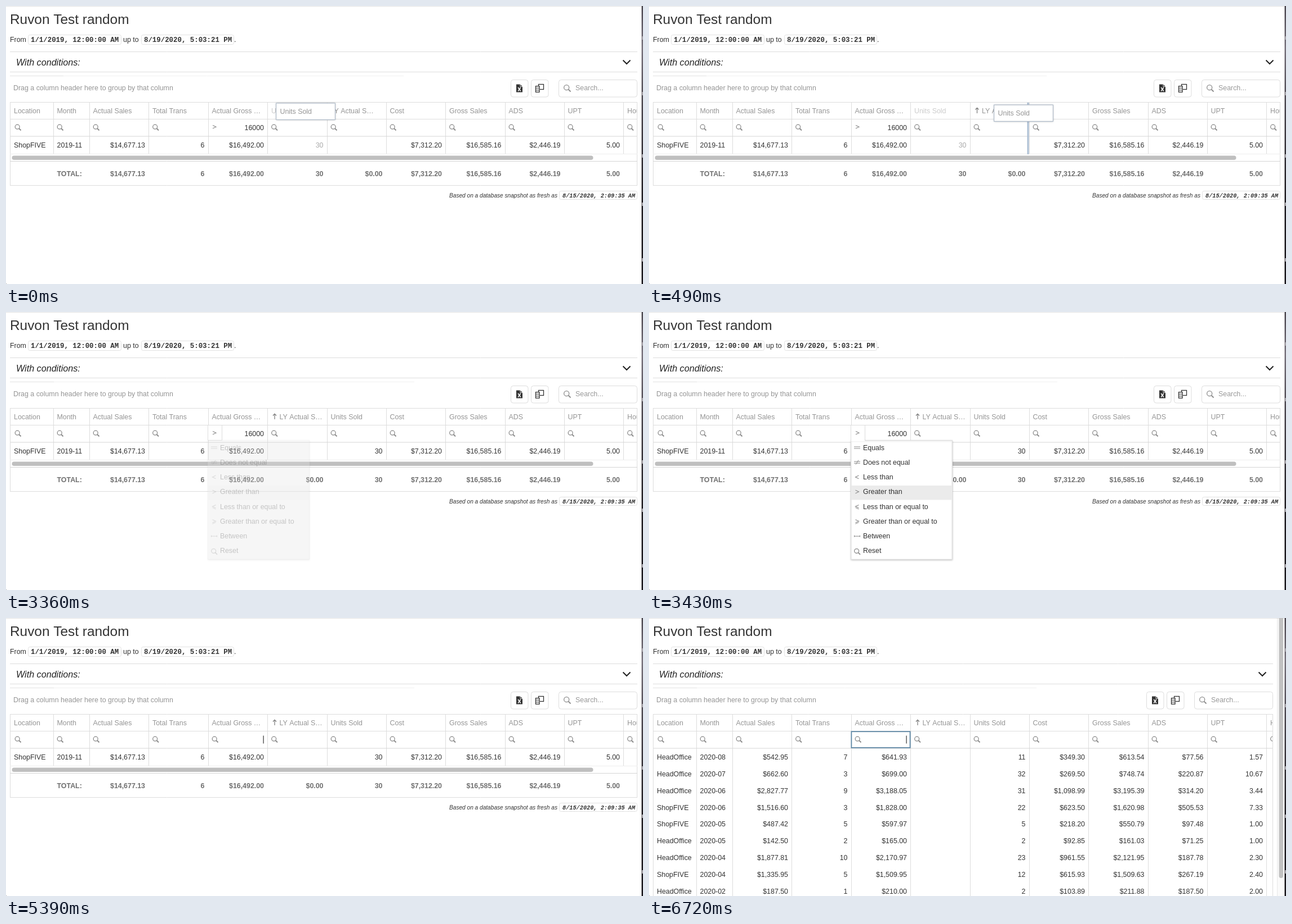
An HTML page with a canvas for the animation above (6.79 s loop, 1131 by 495 pixels).

```html
<!DOCTYPE html>
<html lang="en">
<head>
<meta charset="utf-8">
<title>Report grid</title>
<style>
  html, body { margin: 0; width: 100%; height: 100%; overflow: hidden; background: #fff; }
  canvas { display: block; }
</style>
</head>
<body>
<canvas id="stage" width="1131" height="495"></canvas>
<script>
const ctx = document.getElementById('stage').getContext('2d');
const LOOP = 6790, TICK = 70;
const SANS = '"Liberation Sans", Arial, sans-serif';
const MONO = '"Liberation Mono", monospace';
const INK = '#333', MUTED = '#959595', LINE = '#ddd', ICON = '#8a8a8a';
const BODY = `12.4px ${SANS}`, BOLD = `bold 12.4px ${SANS}`;

const edges = [7.5, 84, 148, 253.5, 359, 464.5, 570, 675, 780.5, 886, 991, 1096.5, 1202];
const titles = ['Location', 'Month', 'Actual Sales', 'Total Trans', 'Actual Gross …',
  'Units Sold', 'LY Actual S…', 'Cost', 'Gross Sales', 'ADS', 'UPT', 'Hours'];
const UNITS = 5, LY = 6;

const parse = line => line.trim().split(/\s+/).map(s => s === '-' ? '' : s);
const filtered = parse('ShopFIVE 2019-11 $14,677.13 6 $16,492.00 30 - $7,312.20 $16,585.16 $2,446.19 5.00');
const totals = parse('- TOTAL: $14,677.13 6 $16,492.00 30 $0.00 $7,312.20 $16,585.16 $2,446.19 5.00');
const allRows = `HeadOffice 2020-08 $542.95 7 $641.93 11 - $349.30 $613.54 $77.56 1.57
  HeadOffice 2020-07 $662.60 3 $699.00 32 - $269.50 $748.74 $220.87 10.67
  HeadOffice 2020-06 $2,827.77 9 $3,188.05 31 - $1,098.99 $3,195.39 $314.20 3.44
  ShopFIVE 2020-06 $1,516.60 3 $1,828.00 22 - $623.50 $1,620.98 $505.53 7.33
  ShopFIVE 2020-05 $487.42 5 $597.97 5 - $218.20 $550.79 $97.48 1.00
  HeadOffice 2020-05 $142.50 2 $165.00 2 - $92.85 $161.03 $71.25 1.00
  HeadOffice 2020-04 $1,877.81 10 $2,170.97 23 - $961.55 $2,121.95 $187.78 2.30
  ShopFIVE 2020-04 $1,335.95 5 $1,509.95 12 - $615.93 $1,509.63 $267.19 2.40
  HeadOffice 2020-02 $187.50 1 $210.00 2 - $103.89 $211.88 $187.50 2.00`.split('\n').map(parse);
const menuItems = ['Equals', 'Does not equal', 'Less than', 'Greater than', 'Less than or equal to',
  'Greater than or equal to', 'Between', 'Reset'];

function text(s, x, y, color = INK, font = BODY, align = 'left') {
  ctx.font = font;
  ctx.fillStyle = color;
  ctx.textAlign = align;
  ctx.fillText(s, x, y);
}

function fill(x, y, w, h, color) {
  ctx.fillStyle = color;
  ctx.fillRect(x, y, w, h);
}

function path(points, color, width = 1) {
  ctx.beginPath();
  points.forEach(([x, y]) => ctx.lineTo(x, y));
  ctx.strokeStyle = color;
  ctx.lineWidth = width;
  ctx.stroke();
}

const hLine = (x1, x2, y, color = LINE) => path([[x1, y], [x2, y]], color);
const vLine = (x, y1, y2, color = LINE) => path([[x, y1], [x, y2]], color);

function box(x, y, w, h, radius = 0, color = LINE, width = 1) {
  ctx.beginPath();
  ctx.roundRect(x, y, w, h, radius);
  ctx.fillStyle = '#fff';
  ctx.fill();
  ctx.strokeStyle = color;
  ctx.lineWidth = width;
  ctx.stroke();
}

function pill(x, y, w, h, radius, color) {
  ctx.beginPath();
  ctx.roundRect(x, y, w, h, radius);
  ctx.fillStyle = color;
  ctx.fill();
}

function magnifier(x, y, size = 11, color = ICON) {
  const r = size * 0.36;
  ctx.beginPath();
  ctx.arc(x + r + 0.7, y + r + 0.7, r, 0, 2 * Math.PI);
  ctx.strokeStyle = color;
  ctx.lineWidth = 1.3;
  ctx.stroke();
  path([[x + r * 1.72 + 0.7, y + r * 1.72 + 0.7], [x + size, y + size]], color, 1.8);
}

function angle(x, y, dir, h = 3) {
  path([[x - 3 * dir, y - h], [x + 3 * dir, y], [x - 3 * dir, y + h]], ICON, 1.1);
}

function clipped(x, y, w, h, draw) {
  ctx.save();
  ctx.beginPath();
  ctx.rect(x, y, w, h);
  ctx.clip();
  draw();
  ctx.restore();
}

function heading(right, t) {
  text('Ruvon Test random', 7, 31.5, INK, `24.4px ${SANS}`);
  text('From', 7, 64.3);
  box(39.5, 51.5, 165, 17, 3, '#e2e2e2');
  text('1/1/2019, 12:00:00 AM', 44, 64.3, INK, `bold 12.4px ${MONO}`);
  text('up to', 208, 64.3);
  box(240.5, 51.5, 164, 17, 3, '#e2e2e2');
  text('8/19/2020, 5:03:21 PM', 245, 64.3, INK, `bold 12.4px ${MONO}`);
  text('.', 405, 64.3);
  hLine(7, right, 81.5);
  hLine(7, right, 117.5);
  text('With conditions:', 18, 105.5, '#222', `italic 16.15px ${SANS}`);
  const x = right - 19;
  path([[x - 6.5, 96.5], [x, 103], [x + 6.5, 96.5]], '#222', 2);
  const dropped = t >= 980;
  hLine(7, t >= 5600 ? 688 : dropped ? 725 : 706, 124.5, '#f1f1f1');
  hLine(7, dropped ? 85 : 102, 124.5, '#e2e2e2');
}

function toolbar(right) {
  text('Drag a column header here to group by that column', 13, 150.2, MUTED);
  box(right - 224.5, 131.5, 30.5, 30.5, 4);
  box(right - 188.5, 131.5, 30.5, 30.5, 4);
  box(right - 139.5, 131.5, 139, 30.5, 4);
  magnifier(right - 131, 140, 12.5);
  text('Search...', right - 110, 150.4, '#999');

  const fx = right - 215;
  ctx.beginPath();
  [[0, 139.5], [7, 139.5], [11, 143.5], [11, 153.5], [0, 153.5]].forEach(([dx, y]) => ctx.lineTo(fx + dx, y));
  ctx.fillStyle = INK;
  ctx.fill();
  path([[fx + 7, 139.5], [fx + 7, 143.5], [fx + 11, 143.5]], '#fff', 0.8);
  path([[fx + 3.2, 145], [fx + 7.8, 151.5]], '#fff', 1.5);
  path([[fx + 7.8, 145], [fx + 3.2, 151.5]], '#fff', 1.5);

  const cx = right - 180.5;
  ctx.strokeStyle = INK;
  ctx.lineWidth = 1.3;
  ctx.strokeRect(cx + 5, 139.5, 9, 9);
  fill(cx - 0.5, 142, 8, 12, '#fff');
  ctx.strokeRect(cx, 142.7, 6.5, 10.6);
  hLine(cx, cx + 6.5, 146.2, INK);
  hLine(cx, cx + 6.5, 149.8, INK);
}

function cells(row, order, y, color, font, fadeUnits) {
  order.forEach((col, i) => {
    const value = row[col];
    if (!value) return;
    const tone = fadeUnits && col === UNITS ? '#aaa' : color;
    if (i < 2) text(value, edges[i] + 6.5, y, tone, font);
    else text(value, edges[i + 1] - 6.5, y, tone, font, 'right');
  });
}

function grid(right, t, order, dragging, sorted) {
  const loaded = t >= 5600, reset = t >= 5390;
  const end = loaded ? 495 : 263.5;
  clipped(7, 171, right - 7, 324, () => {
    order.forEach((col, i) => {
      const x = edges[i];
      if (i) vLine(Math.floor(x) + 0.5, 171, end);
      const arrow = col === LY && sorted;
      if (arrow) {
        const ax = x + 12.5;
        path([[ax, 191], [ax, 181.5]], '#777', 1.2);
        path([[ax - 3, 184.5], [ax, 181.3], [ax + 3, 184.5]], '#777', 1.2);
      }
      text(titles[col], x + (arrow ? 21 : 6.5), 190.5, dragging && col === UNITS ? '#ccc' : MUTED);
      if (i === 4 && !reset) {
        angle(370, 215.2, 1, 2.8);
        text('16000', 458, 221, INK, BODY, 'right');
      } else {
        magnifier(x + (i ? 6.5 : 8), 210.5);
      }
    });
    if (loaded) {
      allRows.forEach((row, i) => cells(row, order, 252 + i * 29.85, INK, BODY));
    } else {
      cells(filtered, order, 252, INK, BODY, dragging);
      cells(totals, order, 302.8, '#707070', BOLD);
    }
  });
  hLine(7, right, 171.5);
  hLine(7, right, 201.5);
  hLine(7, right, 232, '#d5d5d5');
  vLine(7.5, 171, loaded ? 495 : 320);
  vLine(right - 0.5, 171, loaded ? 495 : 320);
  if (loaded) return;
  hLine(7, right, 263.5, '#eee');
  pill(10.5, 266.5, 1032, 7.5, 3.75, '#bfbfbf');
  hLine(7, right, 276.5, '#d5d5d5');
  hLine(7, right, 319.5);
  text('Based on a database snapshot as fresh as', 787, 340.8, INK, `italic 10.15px ${SANS}`);
  box(982.5, 329.5, 138, 15, 3, '#e2e2e2');
  text('8/15/2020, 2:09:35 AM', 988, 340.8, INK, `italic bold 10.25px ${MONO}`);
}

function dragHeader(t) {
  const p = Math.min(t / 490, 1), eased = p * p * (3 - 2 * p);
  if (t >= 280) fill(671.5, 172, 3, 92, '#adbfd4');
  const x = 479.5 + 133 * eased, y = 173 + 3 * eased;
  ctx.save();
  ctx.shadowColor = 'rgba(0,0,0,.15)';
  ctx.shadowBlur = 3;
  box(x, y, 105, 29.5, 0, '#aab8c8');
  ctx.restore();
  text('Units Sold', x + 7, y + 19.2, MUTED);
}

function menuIcon(i, y) {
  const x = 369.5;
  if (i < 2) {
    hLine(x - 5.5, x + 5.5, y - 1.5, ICON);
    hLine(x - 5.5, x + 5.5, y + 1.5, ICON);
    if (i) path([[x - 2.5, y + 4], [x + 2.5, y - 4]], ICON);
  } else if (i < 6) {
    const dir = i % 2 ? 1 : -1;
    angle(x, y, dir, 2.8);
    if (i > 3) path([[x - 3 * dir, y + 4.8], [x + 3 * dir, y + 2]], ICON);
  } else if (i === 6) {
    hLine(x - 5, x + 5, y + 0.5, ICON);
    vLine(x - 5, y - 1, y + 2, ICON);
    vLine(x + 5, y - 1, y + 2, ICON);
  } else {
    magnifier(364, y - 4, 11);
  }
}

function menu(t) {
  box(358.5, 201.5, 25, 27, 0);
  angle(370, 215.2, 1, 2.8);
  ctx.save();
  ctx.globalAlpha = t < 3430 ? 0.25 : 1;
  ctx.shadowColor = 'rgba(0,0,0,.2)';
  ctx.shadowBlur = 3;
  ctx.shadowOffsetY = 1;
  box(358.5, 228.5, 180, 212, 0);
  ctx.shadowColor = 'transparent';
  if (t >= 3430) fill(359, 227, 24, 3, '#fff');
  fill(359.5, 309, 178, 25.5, '#ebebeb');
  menuItems.forEach((item, i) => {
    const y = 241.5 + i * 26.2;
    menuIcon(i, y);
    text(item, 380, y + 4.3);
  });
  ctx.restore();
}

function caretAlpha(t) {
  if (t < 5950) return 1;
  if (t < 6020) return 0.4;
  if (t < 6580) return 0;
  return Math.min(1, (t - 6510) / 210);
}

function editor(t) {
  if (t >= 5600) {
    ctx.strokeStyle = '#5d86a4';
    ctx.lineWidth = 1.8;
    ctx.strokeRect(359.4, 202.2, 104.2, 28.8);
  }
  ctx.globalAlpha = caretAlpha(t);
  fill(456.5, 209.5, 1.2, 14, '#333');
  ctx.globalAlpha = 1;
}

function windowEdge() {
  const shade = ctx.createLinearGradient(0, 0, 0, 495);
  shade.addColorStop(0, '#4a464e');
  shade.addColorStop(0.15, '#77727c');
  shade.addColorStop(0.35, '#4a464e');
  shade.addColorStop(0.7, '#1d1b20');
  shade.addColorStop(1, '#17151a');
  fill(1128.5, 0, 2.5, 495, shade);
  [57, 156, 267, 353, 452].forEach(y => fill(1129, y - 3, 2, 6, '#a5a2a8'));
  hLine(0, 1128, 0, '#c8c8c8');
  fill(0, 494, 1, 1, '#999');
}

function render(time) {
  const t = Math.floor((time % LOOP) / TICK) * TICK;
  const dragging = t < 980, loaded = t >= 5600;
  const right = loaded ? 1108 : 1121;
  const order = titles.map((_, i) => i);
  if (!dragging) [order[5], order[6]] = [LY, UNITS];

  fill(0, 0, 1131, 495, '#fff');
  heading(right, t);
  toolbar(right);
  grid(right, t, order, dragging, t >= 280);
  if (dragging) dragHeader(t);
  if (t >= 3360 && t < 5390) menu(t);
  if (t >= 5390) editor(t);
  if (loaded) {
    fill(1115.5, 0, 13, 495, '#fafafa');
    vLine(1115.5, 0, 495, '#e8e8e8');
    pill(1118.5, -6, 7.5, 469, 3.75, '#c1c1c1');
  }
  windowEdge();
}

const start = performance.now();
function frame() {
  render(performance.now() - start);
  requestAnimationFrame(frame);
}
frame();
</script>
</body>
</html>
```
